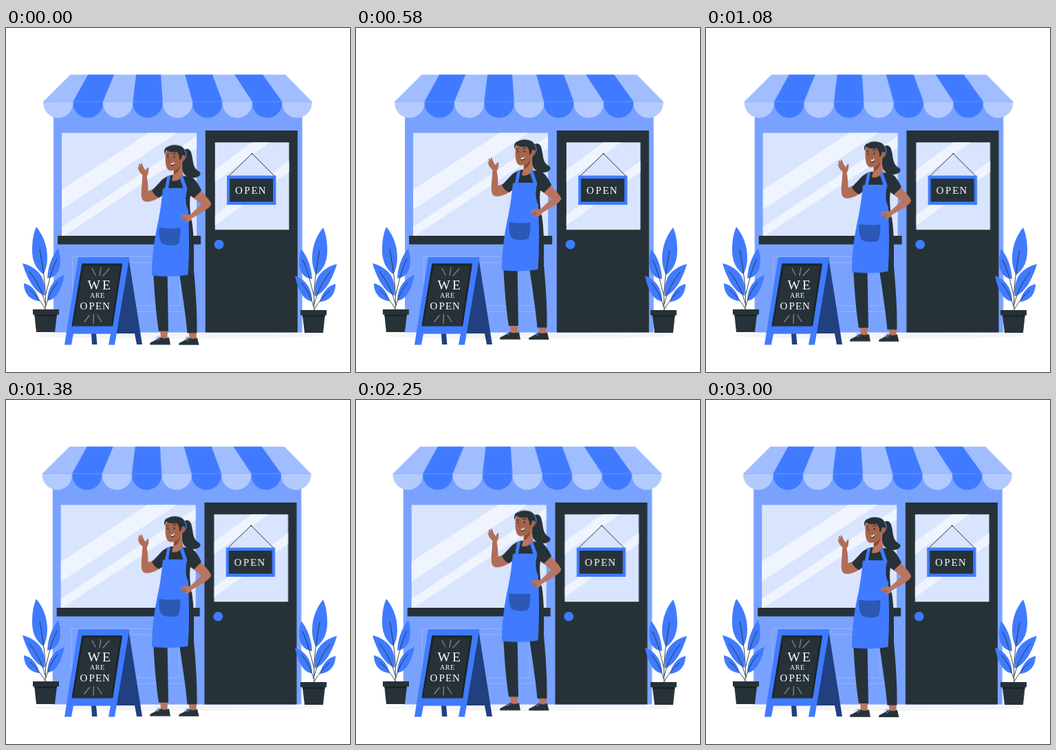
Write an HTML page that moves like this. It is 500 by 500 pixels and loops after 3.04 s.

```html
<!DOCTYPE html>
<html lang="en">
<head>
<meta charset="utf-8">
<title>We are open</title>
<style>
  html, body { margin: 0; width: 100%; height: 100%; overflow: hidden; background: #fff; }
  svg { display: block; width: 100vw; height: 100vh; }
  text { font-family: "Liberation Serif", "Times New Roman", serif; fill: #fff; }

  .blue { fill: #407bff; }
  .dark { fill: #263238; }
  .navy { fill: #204080; }
  .wall { fill: #79a2ff; }
  .stripe { fill: #a0bdff; }
  .scallop { fill: #b3caff; }
  .glass { fill: #d9e5ff; }
  .glare { fill: #eff4ff; }
  .skin { fill: #b97560; }
  .face { fill: #a8644b; }
  .shade { fill: #8a4a38; }
  .line { fill: none; stroke: #263238; stroke-linecap: round; stroke-linejoin: round; }
  .panel { fill: none; stroke: #9cbaff; stroke-width: .8; }
  .chalk { fill: none; stroke: #7d8589; stroke-width: 1.4; stroke-linecap: round; }

  /* 3 s of motion followed by a 40 ms rest */
  .shop, .person { animation: 3040ms linear -25ms infinite; }
  .shop { animation-name: shake; }
  .person { animation-name: float; }
  @keyframes shake {
    0%, 98.68%, 100% { transform: translateX(0); }
    9.87%, 88.82% { transform: translateX(-1px); }
    19.74%, 78.95% { transform: translateX(2px); }
    29.61%, 49.34%, 69.08% { transform: translateX(-4px); }
    39.47%, 59.21% { transform: translateX(4px); }
  }
  @keyframes float {
    0%, 49.34%, 98.68%, 100% { transform: translateY(0); }
    24.67%, 74.01% { transform: translateY(-10px); }
  }
</style>
</head>
<body>
<svg viewBox="0 0 500 500">
  <defs>
    <path id="scallop" d="M0 107H43.4V109A21.7 21.7 0 0 1 0 109Z"/>
    <g id="plant">
      <g class="blue">
        <path d="M44 289C53 300 60 315 60 334C60 343 58 351 54.500 358C44 351 38 339 38 323C38 309 40 298 44 289Z"/>
        <path d="M76 320C80 333 80 347 75 355C71 361 66 363 60 364C61 346 67 331 76 320Z"/>
        <path d="M24 342C40 346 52 356 55 370C56.500 377 56.500 383 56 389C42 384 31 366 24 342Z"/>
        <path d="M85 359C82 373 78 384 71 391C68 394 64 396 60 396.500C60 380 68 365 85 359Z"/>
        <path d="M26 371C38 374 45 383 49 397C36 396 26 387 26 371Z"/>
      </g>
      <path class="line" stroke-width=".9" d="M57 410C59 380 54 349 49 322M57.500 388C62 372 66 350 74 336M58 404C61 391 68 378 75 370M57 400C51 378 42 364 34 354M57 408C50 396 42 387 35 381"/>
      <path class="dark" d="M39 409H77V416.500H74L71 442H44L41.300 416.500H39Z"/>
      <path d="M41.300 416.500H74L73.700 419H41.500Z" fill="#1a2327"/>
    </g>
  </defs>

  <ellipse cx="250" cy="447" rx="208" ry="5" fill="#f5f5f5"/>

  <g class="shop">
    <path class="wall" d="M69.200 107H430.700V442.500H69.200Z"/>

    <!-- awning -->
    <path class="stripe" d="M93.700 67.800H406.200L444.800 107H54.200Z"/>
    <g class="blue">
      <path d="M119.200 67.800H157.200L141 107H97.600Z"/>
      <path d="M189.200 67.800H225.200L227.800 107H184.400Z"/>
      <path d="M260.200 67.800H300.200L314.600 107H271.200Z"/>
      <path d="M332.200 67.800H373.200L401.400 107H358Z"/>
      <use href="#scallop" x="97.600"/>
      <use href="#scallop" x="184.400"/>
      <use href="#scallop" x="271.200"/>
      <use href="#scallop" x="358"/>
    </g>
    <g class="scallop">
      <use href="#scallop" x="54.200"/>
      <use href="#scallop" x="141"/>
      <use href="#scallop" x="227.800"/>
      <use href="#scallop" x="314.600"/>
      <use href="#scallop" x="401.400"/>
    </g>
    <path d="M54.200 107H444.800" stroke="#7ea5ff" stroke-width=".6"/>

    <!-- window -->
    <path class="glass" d="M81.200 152.500H277.200V302H81.200Z"/>
    <path class="glare" d="M81.200 235L207 152.500H249L81.200 264ZM81.200 289L277.200 157V174L84 302H81.200Z"/>
    <path class="dark" d="M75.200 302H283.200V314.500H75.200Z"/>
    <path class="panel" d="M96.700 332.300H262V412H96.700ZM106 341H253V403.700H106Z"/>

    <!-- door -->
    <path class="dark" d="M289.900 149H423.900V442.500H289.900Z"/>
    <path class="glass" d="M303.900 166.300H411.500V293.300H303.900Z"/>
    <path class="glare" d="M303.900 206L358 166.300H383L303.900 224ZM303.900 272L411.500 193V209L303.900 287Z"/>
    <circle class="blue" cx="309.700" cy="314.700" r="6.900"/>
    <path class="line" stroke-width="1" d="M324.200 215L357.700 182.500L390.200 215"/>
    <circle class="dark" cx="357.700" cy="182.700" r="1"/>
    <path class="blue" d="M321.200 214.500H392.500V257H321.200Z"/>
    <path class="dark" d="M325.200 219H388.200V252.500H325.200Z"/>
    <text x="333" y="241.300" font-size="15" letter-spacing="1.800" dx="0 .8 0 -.6">OPEN</text>
  </g>

  <use href="#plant"/>
  <use href="#plant" transform="translate(505 1) scale(-1 1)"/>

  <!-- pavement board -->
  <g>
    <path class="navy" d="M178 333L198 460H190L187 444H160ZM124 444H131L132.500 460H125Z"/>
    <path class="blue" d="M105 333H179.500L158 460.500H149L152 444.500H98L95 460.500H85Z"/>
    <path class="dark" d="M110.500 342.500H169L155 433.500H95.500Z"/>
    <path d="M110.500 342.500H169L155 433.500L153 431L166 345.500H113L98 431L95.500 433.500Z" fill="#1b2529"/>
    <path class="chalk" d="M125 349.500L130 359M138 348.500L136 359.500M150 350L141 360M121 418L114 427M127.500 416.500L127 429M133 417.500L139 427"/>
    <text x="118.500" y="380" font-size="19.500" letter-spacing="3">WE</text>
    <text x="122" y="391.700" font-size="10" letter-spacing=".500">ARE</text>
    <text x="107.500" y="409" font-size="15" letter-spacing="1.300" dx="0 .8 0 -.6">OPEN</text>
  </g>

  <g class="person">
    <!-- feet and legs -->
    <path class="skin" d="M224 438H235L234.500 452H225ZM265 440H277L276.500 452H267Z"/>
    <path class="dark" d="M209 459.500C209 457 213 456.500 217 454L223.500 449.500C227 452 232 452 237 450L239 460.700H209.500ZM251 460C251 457.500 255 457 259 454.500L265 450C269 452.500 274 452.500 278 450.500L280.500 461H251.500Z"/>
    <path d="M217 452L222 454M219.500 449L224 452.500M218 450.500L223 448M259.500 452.500L264.500 454.500M262 449.500L266.500 453M260 451L265 448.500" fill="none" stroke="#8fb1ff" stroke-width="1"/>
    <path class="dark" d="M214 350H234.500L236 441H222C218 415 215.500 385 214 350ZM251 350L260 280H270C274 305 273 330 273 352C276 385 278 415 277.500 443.500H263.500C261 415 256 385 251 350Z"/>

    <!-- ponytail -->
    <path class="dark" d="M257 179C261 174.500 267 175 269 181C273 193 270 203 281 209C284.500 212 282 217 274 218C262 219 254 211 256 199Z"/>

    <!-- raised arm -->
    <path d="M220 231L228 243C219 250 209 254 202 252.500C196 251 196.500 242 197 234L198.500 214C194 211 193 207 191.500 203C191 201.500 193 202 194 204C193 201 192.500 199 193 198C194 197 195 199 196 201C195.500 198 195.500 196.500 196.500 196.500C198 196.500 198.500 200 200 203C200.500 204.500 202 206 203.500 207.500C204 204 206 202.500 207.500 203.500C207 208 207.500 212 204.500 215.500C206 222 206.500 230 206.500 237C212 236 216 233 220 231Z" fill="#b16d56"/>

    <!-- shirt -->
    <path class="dark" d="M241 214C232 216 227 220 223 225L212 236.500C214.500 241.500 218 245 222.500 247L229 242L226 285L270 285C268 270 266 255 268 244L275 249C279 245 282 241 284 236C280 228 275 219 268 216Z"/>

    <!-- neck and head -->
    <path class="skin" d="M244 203L256 194C256 202 256 210 258 214C255 220 247 224 241 222C242 217 244.500 212 244 203Z"/>
    <path class="shade" d="M244 207.500C249 206 252 202 254 198C253 207 249 212 244 213Z"/>
    <path class="face" d="M232 181C231 191 231.500 201 235 205.500C239 210 248 207 252 201C254 199 255 197 255 194C260 195 262 189 260 186C258.500 183.500 256 185 255 187L253 176L236 175Z"/>
    <path class="dark" d="M230.500 184C229 178 231 173.500 236 172.500C241 169.500 250 169.500 256 173C260 176 262 181 260.500 186C258 183 255 186 255 189C254 192 252.500 193 252 191C252.500 187 251 183 248 180C243 182 236 180 233 178C231.500 180 231.500 182 230.500 184Z"/>
    <path d="M259.500 178C262 181 262.500 185 261 189" fill="none" stroke="#407bff" stroke-width="1.300"/>
    <path class="line" stroke-width="1" d="M233 184.500L236.500 183.700M242.500 183.500Q245 181.700 247.500 183"/>
    <ellipse class="dark" cx="235.400" cy="188" rx="1" ry="1.500"/>
    <ellipse class="dark" cx="244.800" cy="187.500" rx="1" ry="1.500"/>
    <path d="M238.500 188.500L236.500 194L239 194.500" fill="none" stroke="#8a4a38" stroke-width=".8"/>
    <path class="dark" d="M238.500 197.500C241 197.500 243.500 196.500 245.500 195C246 198 244 200.500 241.800 200.500C240 200.500 239 199 238.500 197.500Z"/>
    <path d="M238.800 197.600C241 197.600 243.500 196.600 245.500 195.100C245.500 197 244 198.800 241.500 199C240 199 239.200 198.400 238.800 197.600Z" fill="#fff"/>

    <!-- apron -->
    <path class="blue" d="M228 233.500H231L234.500 215L239 215.500L236 233H257.500L252.500 218L257 215L263.500 234C260 247 261 258 265 265C266 295 267 326 264.500 359C248 362 229 362 212 360C212 332 216 304 221.500 280C225 263 226.500 248 228 233.500Z"/>
    <path d="M223 291C233 292.500 243 292.500 253 291.500C253 299 252.700 307 250.500 313C248 317 229 316.500 226 312C223 306 222.500 298 223 291Z" fill="#2d59b6" stroke="#264fa8" stroke-width=".7"/>

    <!-- arm on hip -->
    <path class="skin" d="M273 247.500L283.500 237.500C289 243 295 249 298 255C299 259 293 263 287 267L270 277C269 281 264 283 259 282.500L262 279C259 279.500 256 279 255 277.500C253 275.500 254 272.500 257 272C261 271 265 271 268 271.500L284 256.500Z"/>
    <path d="M255.500 275.500L262 276M257 278.500L263 278.500" fill="none" stroke="#8a4a38" stroke-width=".6"/>
  </g>
</svg>
</body>
</html>
```
